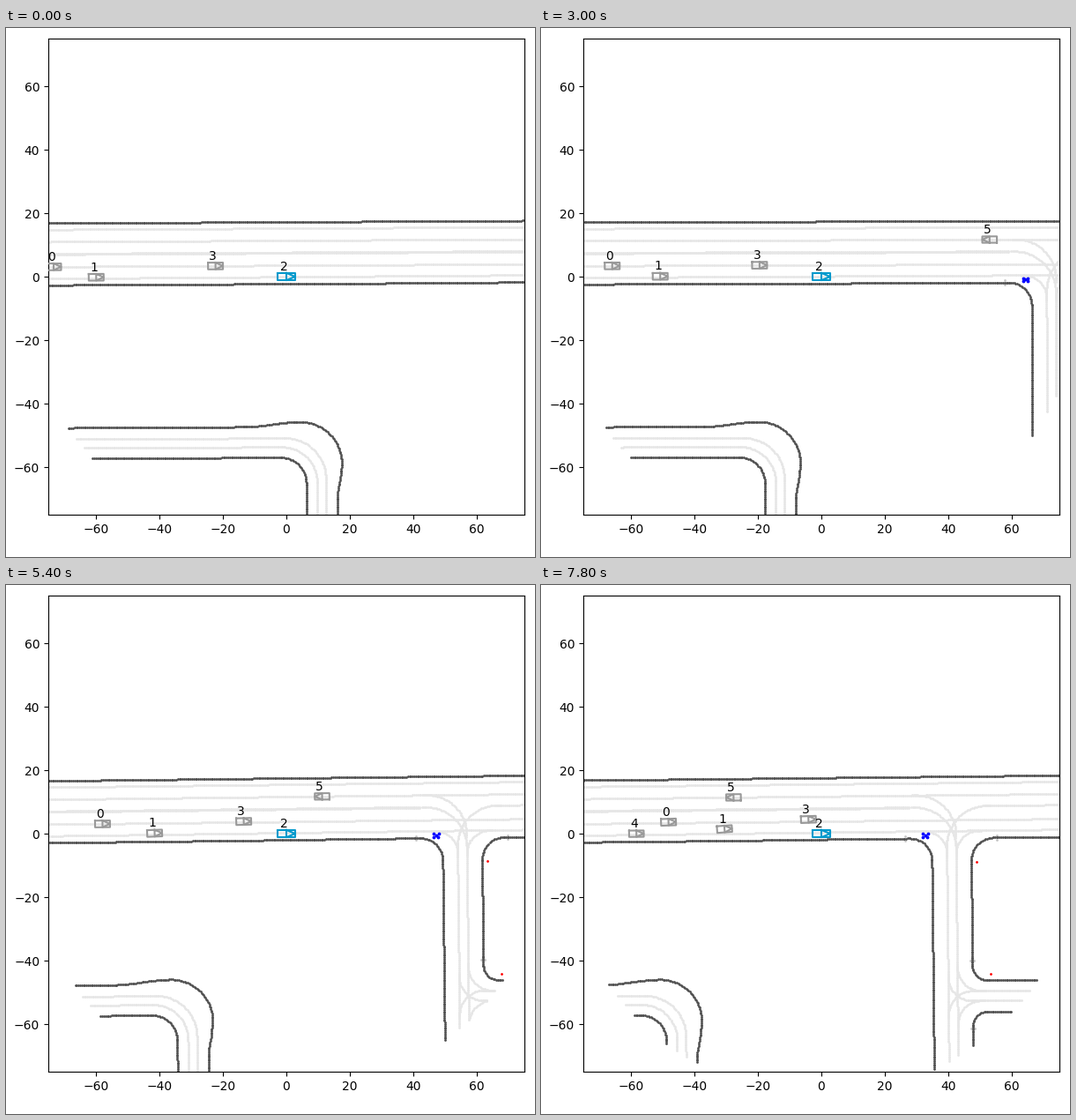
Animation of 600 by 600 pixels, one loop 8000 ms. Source, as a matplotlib script:

```python
import numpy as np
import matplotlib.pyplot as plt
from matplotlib.animation import FuncAnimation

STEP_MS, FRAMES = 200, 40
GAP = 0.5                     # metres between road dots
FAR = 160
LANE, EDGE, MARK = "#e6e6e6", "#505050", "#c4c4c4"
CAR, EGO = (0.6, 0.6, 0.6), (0.0, 0.6, 0.8)


def ease(u):
    u = np.clip(u, 0, 1)
    return u * u * (3 - 2 * u)


# Road geometry, in metres along and across the main road

def line(a, b):
    a, b = np.array(a, float), np.array(b, float)
    n = max(2, int(np.hypot(*(b - a)) / GAP) + 1)
    return a + (b - a) * np.linspace(0, 1, n)[:, None]


def level(y, x0=-110, x1=FAR):
    return line((x0, y), (x1, y))


def arc(cx, cy, r, a0, a1):
    n = int(abs(np.radians(a1 - a0)) * r / GAP) + 2
    a = np.radians(np.linspace(a0, a1, n))
    return np.column_stack([cx + r * np.cos(a), cy + r * np.sin(a)])


def bend(x0, corner, y1, r):
    """Level from x0, round the corner, then upright to y1."""
    x, y = corner
    sx, sy = np.sign(x0 - x), np.sign(y1 - y)
    cx, cy = x + sx * r, y + sy * r
    q = arc(0, 0, r, 0, 90)
    curve = np.column_stack([cx - sx * q[:, 1], cy - sy * q[:, 0]])
    return np.vstack([line((x0, y), (cx, y)), curve, line((x, cy), (x, y1))])


def turn(x, y, r, side, way=-1):
    """Short bend joining a level lane y to an upright lane x."""
    return bend(x + side * (r + 1), (x, y), y + way * (r + 1), r)


def sweep(a, b):
    """Eased S between two points."""
    u = line((0, 0), (np.hypot(b[0] - a[0], b[1] - a[1]), 0))[:, 0]
    u = u / u[-1]
    return np.column_stack([a[0] + (b[0] - a[0]) * u, a[1] + (b[1] - a[1]) * ease(u)])


def drop(a, b):
    """Eased S going down instead of along."""
    return sweep(a[::-1], b[::-1])[:, ::-1]


SB, NB = 94.9, 97.8           # side street lanes
WB, EB = -50.4, -53.5         # lower street lanes
WEST, EAST = 90.2, 102.6      # side street edges

lanes = np.vstack(
    [level(y) for y in (15.2, 11.35, 3.5)]
    + [level(y, -110, 83) for y in (7.4, 7.6)]
    + [sweep((-110, -0.25), (FAR, 0.15)), level(7.9, 107, FAR)]
    + [line((x, -4), (x, -100)) for x in (SB, NB)]
    + [turn(NB, 11.4, 12.5, -1), turn(NB, 7.6, 13, -1), turn(SB, 7.9, 12.5, 1)]
    + [turn(SB, 0, 7, -1), turn(NB, 0, 7, 1)]
    + [level(y, 103, 140) for y in (WB, EB)]
    + [turn(x, y, 7.5, 1, way) for x, y, way in
       ((NB, WB, 1), (SB, WB, -1), (SB, EB, 1), (NB, EB, -1))]
    + [bend(-100, (12.1, -50.9), -95, 12.8), bend(-100, (9.3, -53.7), -95, 11)])

bulb = arc(4, -58.9, 13.1, 98, -12)
edges = np.vstack([
    level(17.2),
    level(-2.3, -110, 20), sweep((20, -2.3), (70, -2.2)),
    bend(70, (WEST, -2.2), -100, 7),
    bend(FAR, (EAST, -2.2), -40, 7),
    bend(140, (EAST, -47.1), -40, 4.5),
    bend(140, (EAST, -57), -90, 4.5),
    level(-47.3, -100, -13), sweep((-13, -47.3), bulb[0]), bulb,
    drop(bulb[-1], (15.65, -70)), line((15.65, -70), (15.65, -95)),
    bend(-100, (5.9, -57), -95, 8),
])

side = np.array([(-0.6, 0), (0, 0), (0.6, 0)])
marks = np.vstack([side[:, ::-1] + (x, -2.2) for x in (81.8, 110.7)]
                  + [side + (EAST, y) for y in (-40.8, -62.3)])
stops = np.array([(104.25, -9.75), (108.3, -45.1)])
signal = np.array([(88.2, -1.35)]) + np.array(
    [(-0.7, 0.5), (0.75, 0.5), (0, 0), (-0.75, -0.5), (0.65, -0.55)])


# Motion of the view

def travel(t):
    return t * (8.35 - 0.095 * t - 0.0082 * t * t)


def tilt(t):
    return 0.0035 + 0.002 * (1 - ease(t / 1.8)) + 0.008 * ease((t - 3.2) / 2.2) \
        - 0.001 * ease((t - 6.2) / 1.6)


def lift(t):
    return 0.03 + 0.046 * t


def reach(t):
    return 83.75 - 1.5 * ease((t - 1) / 4.4)


class Car:
    """Box at x + v t + a t^2 in its lane, drifting sideways after `since`."""

    def __init__(self, name, x, v, a, lane, drift=0, since=0, size=(4.7, 2.1),
                 back=False, start=0, color=CAR):
        self.move, self.lane, self.drift, self.since = (x, v, a), lane, drift, since
        self.size, self.back, self.start = size, back, start
        self.box, self.arrow = (ax.plot([], [], color=color, zorder=4)[0]
                                for _ in range(2))
        self.label = ax.text(0, 0, name, zorder=10)

    def pose(self, t):
        x0, v, a = self.move
        x, late = x0 + v * t + a * t * t, max(t - self.since, 0)
        y = self.lane + self.drift * late**2 + tilt(t) * x + lift(t)
        return x, y, tilt(t) + 0.2 * self.drift * late + np.pi * self.back

    def draw(self, t):
        x, y, yaw = self.pose(t)
        c, s = np.cos(yaw), np.sin(yaw)
        a, b = self.size[0] / 2, self.size[1] / 2
        shapes = {self.box: [(-a, b), (a, b), (a, -b), (-a, -b), (-a, b)],
                  self.arrow: [(0, b), (0, -b), (a, 0), (0, b)]}
        shown = t > self.start - 0.01
        for part, pts in shapes.items():
            p, q = np.array(pts).T
            part.set_data(x + p * c - q * s, y + p * s + q * c)
            part.set_visible(shown)
        self.label.set_position((x - 2, y + 2))
        self.label.set_visible(bool(shown and abs(x) < 75))


class Ego(Car):
    def pose(self, t):
        return 0, 0, 0


fig, ax = plt.subplots(figsize=(6, 6), dpi=100)
fig.subplots_adjust(left=0.08, bottom=0.08, right=0.98, top=0.98)
ax.set(xlim=(-75, 75), ylim=(-75, 75))
ax.set_xticks(range(-60, 61, 20))
ax.set_yticks(range(-60, 61, 20))


def dots(pts, color, ms=2):
    return pts, ax.plot([], [], ".", color=color, ms=ms)[0]


layers = [dots(lanes, LANE), dots(marks, MARK), dots(edges, EDGE),
          dots(stops, "#ff0000"), dots(signal, "#0000ff", 3.5)]

cars = [
    Car("0", -73.33, 2.01, 0.156, 3.45, 0.05, 5.4),
    Car("1", -59.92, 2.6, 0.15, 0.1, 0.076, 3.7),
    Ego("2", 0, 0, 0, 0, size=(5.5, 2.3), color=EGO),
    Car("3", -22.33, 0.086, 0.289, 3.45, 0.017, 1.5),
    Car("4", -90.8, 4.17, 0, 0.2, size=(4.6, 2), start=5.8),
    Car("5", 109.1, -19.43, 0.243, 11.32, size=(4.6, 2), back=True),
]


def draw(i):
    t = i * STEP_MS / 1000
    c, s = np.cos(tilt(t)), np.sin(tilt(t))
    for pts, dot in layers:
        x, y = pts[:, 0] - travel(t), pts[:, 1]
        u, v = x * c - y * s, x * s + y * c + lift(t)
        near = np.hypot(u, v) < reach(t)
        dot.set_data(u[near], v[near])
    for car in cars:
        car.draw(t)
    return []


anim = FuncAnimation(fig, draw, frames=FRAMES, interval=STEP_MS,
                     init_func=lambda: draw(0), repeat=True, repeat_delay=0)
plt.show()
```
